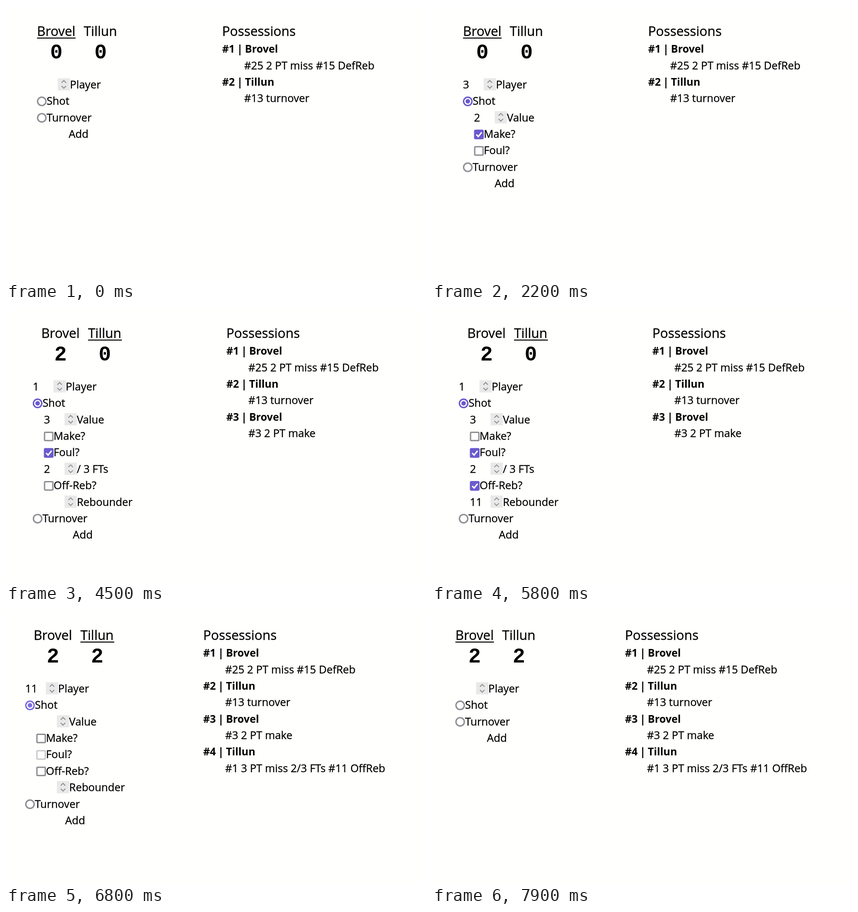
An HTML page that plays this animation: 925 by 605 pixels, repeating every 8 s.

```html
<!DOCTYPE html>
<html lang="en">
<head>
<meta charset="utf-8">
<title>Possession tracker</title>
<style>
  html, body { margin: 0; width: 100%; height: 100%; overflow: hidden; background: #fffffe; }
  svg { display: block; width: 925px; height: 605px; }
  text { font: 23.6px "Open Sans", "Noto Sans", sans-serif; fill: #000; stroke: #000; stroke-width: .35px; white-space: pre; }
  .head { font-size: 28.8px; }
  .bold { font-size: 23px; font-weight: 700; word-spacing: -1.2px; stroke: none; }
  .score { font: 700 45.5px "Liberation Mono", monospace; text-anchor: middle; stroke: none; }
</style>
</head>
<body>
<svg id="stage" viewBox="0 0 925 605"></svg>
<script>
const LOOP = 8000, ROW = 36.37, INDENT = 24.3;
const ACCENT = '#6a5acd', ACCENT_HOVER = '#7d6ee2';
const GREY = '#8f8f94', GREY_HOVER = '#5b5b66', GREY_OFF = '#cacace';
const teams = [{ name: 'Brovel', width: 85 }, { name: 'Tillun', width: 74.5 }];
const plays = [
  [0, '#25 2 PT miss #15 DefReb'],
  [1, '#13 turnover'],
  [0, '#3 2 PT make'],
  [1, '#1 3 PT miss 2/3 FTs #11 OffReb']
];

const blank = { player: '', shot: false, value: '', make: false, foul: false, fts: '', off: false, reb: '', hover: '' };
// [time in ms, what the user's action changes]
const steps = [
  [0, { ...blank, side: 0, score: [0, 0], count: 2 }],
  [400, { player: '3' }],
  [900, { shot: true, hover: 'shot' }],
  [1400, { hover: '' }],
  [1600, { value: '2' }],
  [1800, { hover: 'make' }],
  [2000, { make: true }],
  [2200, { hover: '' }],
  [2500, { ...blank, side: 1, score: [2, 0], count: 3 }],
  [2800, { player: '1' }],
  [3000, { shot: true, hover: 'shot' }],
  [3300, { hover: '' }],
  [3500, { value: '3' }],
  [3700, { hover: 'foul' }],
  [4000, { foul: true }],
  [4200, { hover: '' }],
  [4400, { fts: '2' }],
  [4700, { hover: 'off' }],
  [4900, { off: true }],
  [5000, { hover: '' }],
  [5300, { reb: '1' }],
  [5500, { reb: '11' }],
  [6000, { ...blank, score: [2, 2], count: 4 }],
  [6200, { player: '1' }],
  [6400, { player: '11' }],
  [6700, { shot: true, hover: 'shot' }],
  [7000, { hover: '' }],
  [7300, { ...blank, side: 0 }]
];

const text = (x, y, s, cls = '') => `<text x="${x}" y="${y}" class="${cls}">${s}</text>`;

function numberField(x, y, value, label) {
  const cx = x + 59, cy = y - 9;
  return text(x, y, value) +
    `<rect x="${cx - 13.5}" y="${cy - 13.5}" width="27" height="27" fill="#e9e9e9"/>` +
    `<path d="M${cx - 5} ${cy - 3.5}l5-5 5 5M${cx - 5} ${cy + 3.5}l5 5 5-5" fill="none" stroke="#909094" stroke-width="2"/>` +
    text(x + 72.5, y, label);
}

function radio(x, y, on, hover, label) {
  const cx = x + 10.5, cy = y - 7.8;
  const color = on ? (hover ? ACCENT_HOVER : ACCENT) : (hover ? GREY_HOVER : GREY);
  return `<circle cx="${cx}" cy="${cy}" r="9.2" fill="#fff" stroke="${color}" stroke-width="3.1"/>` +
    (on ? `<circle cx="${cx}" cy="${cy}" r="5" fill="${color}"/>` : '') +
    text(x + 21.3, y, label);
}

function checkbox(x, y, on, hover, label, off) {
  const top = y - 18.2;
  const color = on ? (hover ? ACCENT_HOVER : ACCENT) : off ? GREY_OFF : hover ? GREY_HOVER : GREY;
  return `<rect x="${x + 1.5}" y="${top + 1.5}" width="18.4" height="18.4" rx="1.8" fill="${on ? color : '#fff'}" stroke="${color}" stroke-width="3"/>` +
    (on ? `<path d="M${x + 5} ${top + 11}l4.3 4.4 7.7-9.4" fill="none" stroke="#fff" stroke-width="3"/>` : '') +
    text(x + 21.4, y, label);
}

function form(s, x, needReb, addX) {
  const in1 = x + INDENT, rows = [];
  const row = (draw, left, ...args) => rows.push(draw(left, 182 + ROW * rows.length, ...args));
  row(numberField, x, s.player, 'Player');
  row(radio, x, s.shot, s.hover === 'shot', 'Shot');
  if (s.shot) {
    row(numberField, in1, s.value, 'Value');
    row(checkbox, in1, s.make, s.hover === 'make', 'Make?');
    row(checkbox, in1, s.foul, s.hover === 'foul', 'Foul?', !s.value);
    if (s.foul) row(numberField, in1, s.fts, `/ ${s.make ? 1 : s.value} FTs`);
    if (needReb) {
      row(checkbox, in1, s.off, s.hover === 'off', 'Off-Reb?');
      row(numberField, in1, s.reb, 'Rebounder');
    }
  }
  row(radio, x, false, false, 'Turnover');
  row(text, addX, 'Add');
  return rows.join('');
}

function board(s, x) {
  return teams.map((team, i) => {
    const left = x + i * 103;
    return text(left, 66, team.name, 'head') +
      text(x + 42.5 + i * 97.5, 116, s.score[i], 'score') +
      (s.side === i ? `<rect x="${left}" y="69.7" width="${team.width}" height="2.2"/>` : '');
  }).join('');
}

function log(s, x) {
  return text(x, 66, 'Possessions', 'head') + plays.slice(0, s.count).map(([side, line], i) => {
    const y = 103.2 + i * 2 * ROW;
    return text(x, y, `#${i + 1} | ${teams[side].name}`, 'bold') + text(x + 48.5, y + ROW, line);
  }).join('');
}

function draw(s) {
  const needReb = s.shot && (s.foul ? +s.fts < (s.make ? 1 : +s.value) : !s.make);
  const long = s.count > 3;
  const left = (long ? 51.5 : 68.3) - (needReb ? 9.2 : 0);
  const right = (long ? 425 : 476) + (needReb ? 9.2 : 0);
  return board(s, left + (needReb ? 18.6 : 0)) +
    form(s, left, needReb, left + (needReb ? 88 : 69.6)) +
    log(s, right);
}

const stage = document.getElementById('stage');
let state = {};
const scenes = steps.map(([at, change]) => {
  state = { ...state, ...change };
  return { at, svg: draw(state) };
});

let shown = null;
const start = performance.now();
function tick() {
  const t = (performance.now() - start) % LOOP;
  const scene = scenes.filter(sc => sc.at <= t).pop() || scenes[0];
  if (scene !== shown) {
    stage.innerHTML = scene.svg;
    shown = scene;
  }
  requestAnimationFrame(tick);
}
tick();
</script>
</body>
</html>
```
